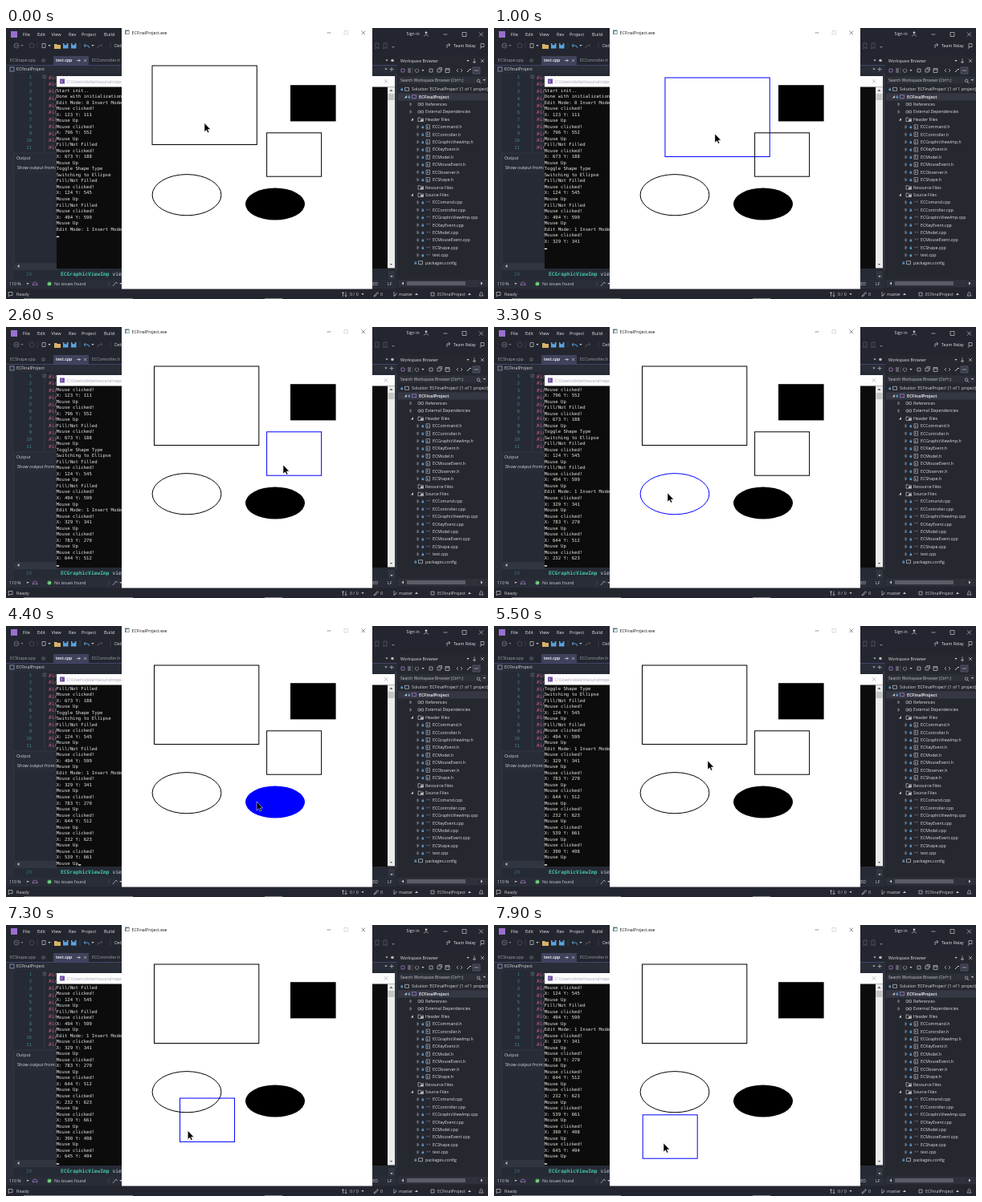
An HTML page for the animation above (8000 ms loop, 600 px wide and 338 px high).

```html
<!DOCTYPE html>
<html lang="en">
<head>
<meta charset="utf-8">
<title>Shape editor session</title>
<style>
  html, body { margin: 0; width: 100%; height: 100%; overflow: hidden; background: #23262f; }
  svg { display: block; width: 100vw; height: 100vh; }
  text { font-family: "Open Sans", "Noto Sans", sans-serif; white-space: pre; }
  .mono { font-family: "DejaVu Sans Mono", "Liberation Mono", monospace; }
</style>
</head>
<body>
<svg id="stage" viewBox="0 0 600 338">
  <g id="ide"></g>
  <g id="terminal"></g>
  <g id="app"></g>
</svg>
<script>
const $ = id => document.getElementById(id);

// Markup helpers
const box = (x, y, w, h, fill, extra = '') =>
  `<rect x="${x}" y="${y}" width="${w}" height="${h}" fill="${fill}" ${extra}/>`;
const label = (x, y, s, fill = '#d4d4d8', size = 5.25, extra = '') =>
  `<text x="${x}" y="${y + size * 0.36}" font-size="${size}" fill="${fill}" ${extra}>${s}</text>`;
const line = (d, stroke = '#c8c8cc', width = 0.7) =>
  `<path d="${d}" fill="none" stroke="${stroke}" stroke-width="${width}"/>`;
const solid = (d, fill = '#c8c8cc') => `<path d="${d}" fill="${fill}"/>`;
const dot = (x, y, r, fill) => `<circle cx="${x}" cy="${y}" r="${r}" fill="${fill}"/>`;
const cross = (x, y, r, color, w) =>
  line(`M${x - r} ${y - r}l${2 * r} ${2 * r}m0 ${-2 * r}l${-2 * r} ${2 * r}`, color, w);
const down = (x, y, color) => solid(`M${x - 1.6} ${y - 1}h3.2l-1.6 2z`, color);
const MONO = 'class="mono"';

function menuAndToolbar() {
  const menu = [['File', 21], ['Edit', 39], ['View', 56.5], ['Rev', 78], ['Project', 94], ['Build', 122]];
  return box(0, 0, 600, 338, '#23262f') +
    box(6, 4, 8, 8, '#9a6fd0') +
    menu.map(([s, x]) => label(x, 8, s, '#e4e4e8', 5.6)).join('') +
    label(498.5, 7, 'Sign in', '#e4e4e8') +
    dot(523, 5.8, 1.4, '#c8c8cc') + line('M520.3 10.5q2.7-4.5 5.4 0') +
    line('M544.5 8h5') + line('M568 5.5h5v5h-5z') + cross(591.5, 8, 2.5, '#c8c8cc', 0.7) +
    // toolbar
    line('M10 22a3 3 0 1 0 6 0a3 3 0 1 0-6 0m1.2 0h3.6', '#85858f') + down(20, 22, '#77777f') +
    line('M29 22a3 3 0 1 0 6 0a3 3 0 1 0-6 0', '#555560') + line('M39 18v8', '#44444e') +
    line('M45 19.5h4v5h-4z') + down(54, 22) +
    solid('M60 20h3l1 1h4v5h-8z', '#d9b36a') +
    box(71, 19, 6.5, 6.5, '#5ba3e0') + box(72.5, 19, 3.2, 2.2, '#23262f') +
    box(81, 19, 6.5, 6.5, '#5ba3e0') + box(82.5, 19, 3.2, 2.2, '#23262f') +
    line('M92 18v8', '#44444e') + line('M97 22h4q3 0 2.5 3M99 20l-2 2l2 2', '#5ba3e0', 0.9) +
    down(108, 22) + line('M114 25q0-3 3-3h3l-2-2', '#666670') + line('M130 18v8', '#44444e') +
    label(135, 22, 'Debug') +
    line('M460 19h4v7l-2-2l-2 2zM470 19h4v7l-2-2l-2 2z', '#5c5f6a') + down(482, 24, '#888') +
    line('M549 25v-4h3m-1-2l2 2l-2 2', '#d0d0d4') + label(557, 22, 'Team Relay', '#e0e0e4') +
    line('M591 19.5h4v4h-4zM590 26l2-3', '#c8c8cc');
}

function editor() {
  let s = label(5, 40.5, 'ECShape.cpp', '#a4a4ac') + line('M45 39h3v3h-3z', '#8c8c96', 0.6) +
    box(59, 35, 44, 11.5, '#40425c') +
    label(62, 40.5, 'test.cpp', '#fff', 5.25, 'font-weight="600"') +
    line('M88 40.5h5m-2-1.7v3.4', '#ddd') + cross(98.5, 40.5, 1.6, '#ddd', 0.6) +
    label(107, 40.5, 'ECController.h', '#a4a4ac') +
    box(0, 46, 487, 0.8, '#55508a') +
    box(0, 46.8, 487, 9.2, '#292d37') + box(5, 49, 5, 5, 'none', 'stroke="#9bb0d0" stroke-width=".7"') +
    label(13, 51.5, 'ECFinalProject', '#dcdce0') +
    box(0, 56, 487, 258, '#262a34') + box(0, 56, 10, 258, '#2b2f39');
  for (let i = 0; i < 11; i++) {
    const y = 61.3 + i * 8.75;
    s += label(32, y, i + 1, '#3f8494', 5.6, MONO + ' text-anchor="end"') +
      label(53, y, '#include', '#c45a78', 6.2, MONO);
  }
  s += line('M46 59h3.5v3.5h-3.5zM47 60.8h1.5', '#80808a', 0.5) + line('M48 63v92', '#484c56', 0.5) +
    down(474, 40.5) + dot(481, 40.5, 1.8, '#b8b8be') + down(473, 51.5) +
    line('M480 49v5m-2.5-2.5h5', '#c0c0c4') +
    box(484, 57, 3, 245, '#303440') +
    label(25, 307, '29', '#35707e', 6, MONO) +
    label(68, 307, 'ECGraphicViewImp', '#43c4a8', 6.3, MONO + ' font-weight="bold"') +
    label(132.5, 307, 'view', '#c8d8e8', 6.3, MONO) +
    // output panel
    box(10, 156, 54, 145.5, '#282c36', 'stroke="#3a3e48" stroke-width=".6"') +
    label(13, 162.5, 'Output', '#dcdce0') + label(14, 174, 'Show output from:', '#dcdce0', 5.5) +
    box(11, 181, 52, 112, '#262a34') +
    box(11, 293, 52, 8, '#31353f') + solid('M16.5 295v4l-2.5-2z') +
    // editor footer
    box(0, 314, 487, 11, '#292d37') + label(4, 319, '110 %') + down(27, 319) +
    line('M33 321q0-4 3-4t3 4l-3-1z', '#b080d8') + dot(54, 319, 2.6, '#57b560') +
    line('M52.8 319l1 1l1.7-2', '#fff', 0.6) + label(60, 319, 'No issues found') +
    line('M128 316v6', '#50505a') + line('M133 322l4-5m0 0l2 2') + down(143, 319) +
    label(447, 319, 'MIXED') + label(475, 319, 'LF') +
    box(476, 303, 8, 10, '#33363f') + down(480, 310);
  return s;
}

function tree() {
  const top = ['Solution \'ECFinalProject\' (1 of 1 project)', 'ECFinalProject', 'References',
    'External Dependencies', 'Header Files'];
  const headers = 'Command Controller GraphicViewImp KeyEvent Model MouseEvent Observer Shape'
    .split(' ').map(n => `EC${n}.h`);
  const sources = 'Comand Controller GraphicViewImp KeyEvent Model MouseEvent Shape'
    .split(' ').map(n => `EC${n}.cpp`);
  const rows = [...top, ...headers, 'Resource Files', 'Source Files', ...sources, 'test.cpp', 'packages.config'];
  let s = box(488, 35, 112, 290, '#25282f') +
    label(491, 41, 'Workspace Browser', '#e0e0e4', 5.1) +
    down(575, 41) + line('M583 38.5v4m-2 0h4m-2 0v2') + cross(593, 41, 1.9, '#ccc', 0.7) +
    line('M492 51h4v4h-4z', '#b080d8') + line('M500 53h4m-4 2h4m-4-4h4') + line('M506 49v8', '#55555e') +
    down(519, 53) + line('M511 51a2.2 2.2 0 1 0 1 0', '#b8b8bc') + line('M527 51h4v4h-4z') +
    line('M537 51h4v4h-4zm1.5-1.5h4v4') + line('M547 50.5h5v5h-5zM547 52h5') +
    line('M563 51l-2 2l2 2m3-4l2 2l-2 2') + line('M574 55l4-4m0 0l1 1', '#ccc', 1) +
    box(581, 49, 9, 8, '#3a3d48', 'stroke="#6a6490" stroke-width=".6"') + line('M583 53h5') +
    box(489, 60.5, 110, 9, '#2d3039') +
    label(491, 65, 'Search Workspace Browser (Ctrl+;)', '#c8c8cc', 4.9) +
    line('M588 64a1.7 1.7 0 1 0 .1 0m1 3l2 2') + down(595.5, 65) +
    box(488, 81.3, 112, 9.2, '#353843');
  rows.forEach((name, i) => {
    const y = 76.3 + i * 9.41;
    const file = /\.(h|cpp)$/.test(name);
    const x = i == 0 ? 505 : i == 1 ? 514 : file ? 531 : 522;
    s += label(x, y, name, '#e0e0e4', 5.25, i == 1 ? 'font-weight="bold"' : '');
    const open = i == 1 || name == 'Header Files' || name == 'Source Files';
    if (open) s += solid(`M${x - 15} ${y + 1.5}h-3.2l3.2-3.2z`);
    else if (i && i < 24 && name != 'Resource Files' && name != 'packages.config')
      s += line(`M${x - 19} ${y - 1.8}l2 1.8l-2 1.8z`, '#b8b8be', 0.6);
    if (file || i < 2 || name == 'packages.config') s += box(x - 13.5, y - 0.3, 2.6, 2.2, '#5a9bd0') +
      line(`M${x - 13} ${y}v-1.2h1.6v1.2`, '#5a9bd0', 0.5);
    if (/\.h$/.test(name)) s += line(`M${x - 8} ${y - 2.6}h4.5v5.2h-4.5z`, '#c8c8cc', 0.6) +
      label(x - 7.2, y, 'h', '#d8d8dc', 4);
    else if (file) s += label(x - 8, y, '++', '#b070c0', 4.6);
    else if (i == 2 || i == 3) s += line(`M${x - 9} ${y - 1.5}h2.5v3h-2.5zm4 0h2.5v3h-2.5zm-1.5 1.5h1.5`, '#c0c0c4', 0.6);
    else if (/Files/.test(name)) s += line(`M${x - 9} ${y - 2}h2.5l1 1h3v3.6h-6.5z`, '#c0c0c4', 0.7) +
      box(x - 6, y, 3.5, 2.4, '#b8b8bc');
    else s += line(`M${x - 8.5} ${y - 2}h5v4h-5z`, i == 1 ? '#b080d8' : '#c8c8cc', 0.7);
  });
  return s + box(488, 314, 112, 9, '#2e313a') + box(499, 316, 73, 5, '#5a5d66') +
    solid('M495 316.5v4l-2.5-2z') + solid('M591 316.5v4l2.5-2z');
}

function statusBar() {
  return box(0, 325, 600, 13, '#23262f') +
    line('M3 329.5h5v4h-3l-1.5 1.5z') + label(13, 332, 'Ready', '#d4d4d8', 5.5) +
    line('M419.5 335v-5.5l-1.5 1.5m1.5-1.5l1.5 1.5m2-1.5v5.5l-1.5-1.5m1.5 1.5l1.5-1.5') +
    label(428, 332, '0 / 0') + down(444, 332) +
    line('M458 335l1-2l3.5-3.5l1 1l-3.5 3.5z') + label(466, 332, '0') +
    line('M483 329v6m0-1q3 0 3-3.5') + label(489, 332, 'master') + solid('M509 333h4l-2-2.5z') +
    line('M529 330h4v4h-4z') + label(537, 332, 'ECFinalProject') + solid('M575 333h4l-2-2.5z') +
    line('M589 334h5l-1-1.5v-2q-1.5-2.5-3 0v2z') +
    box(22, 337.2, 136, 0.8, '#a0a0a0') + box(322, 337.2, 22, 0.8, '#a0a0a0');
}

$('ide').innerHTML = menuAndToolbar() + editor() + tree() + statusBar();

// Terminal window
const ROWS = 30, ROW_H = 7.52;
$('terminal').innerHTML = box(63, 60, 421, 240, '#0c0c0c') + box(63, 60, 421, 13.5, '#fdfdfd') +
  box(67, 63.5, 6, 6, '#6f4fa0') + line('M68.3 65l1.5 1.5l-1.5 1.5', '#fff', 0.6) +
  label(75.5, 66.7, 'C:\\Users\\dolan\\source\\repos', '#a69ab4', 5.4) +
  cross(473, 66.5, 2.3, '#999', 0.6) +
  box(475, 73.5, 9, 226, '#ececec') + box(475.5, 82, 8, 8, '#c6c6c6') +
  solid('M477.5 79h4l-2-2.5z', '#666') + down(479.5, 295, '#666') +
  Array.from({ length: ROWS }, (_, i) =>
    label(62.7, 77.6 + i * ROW_H, '', '#e6e6e6', 5.65, MONO)).join('') +
  '<rect id="caret" width="3.2" height="1.4" fill="#f2f2f2"/>';
const rowTexts = [...$('terminal').querySelectorAll('text.mono')];

// Application window
$('app').innerHTML = box(144, 0, 312, 325.5, '#fff') +
  box(148, 2.5, 5.5, 5.5, '#5c7f86') + box(149.5, 4, 3.4, 3.4, '#e8f0f0') +
  label(156.5, 5.7, 'ECFinalProject.exe', '#111', 5.2) +
  line('M399.5 6h5', '#555', 0.6) + line('M421 3.5h4.5v4.5h-4.5z', '#c4c4c4', 0.6) + cross(444.8, 5.8, 2.3, '#444', 0.6) +
  '<g stroke-width="1">' +
  box(182, 47, 130.3, 98.5, 'none', 'id="big"') +
  box(354, 71.2, 56.6, 45.2, '#000', 'id="block"') +
  box(324.6, 130.8, 68, 54.4, 'none', 'id="small"') +
  '<ellipse id="ring" cx="225" cy="208.2" rx="42.9" ry="25.6" fill="none"/>' +
  '<ellipse id="disc" cx="335" cy="219.6" rx="37" ry="20"/></g>' +
  '<path id="pointer" d="M0-1V10L2.5 7.7L4.2 11.2L5.8 10.4L4.3 7H7.6Z" stroke="#fff" stroke-width=".5"/>';

// Pointer path: time, x, y
const path = [
  [0, 247, 119.5], [100, 247, 119.5], [600, 295, 143], [1000, 275, 133], [1500, 249.5, 121.5],
  [1600, 249.5, 121.5], [1950, 388, 97], [2150, 388, 97], [2480, 345, 173], [2850, 345, 173],
  [3300, 216, 208], [3550, 216, 208], [4000, 312, 220], [4450, 312, 220], [5100, 266, 169],
  [5700, 266, 169], [6250, 345, 167], [6440, 345, 167], [6540, 332.5, 169.5], [6600, 326, 173],
  [7100, 262, 240], [7550, 182, 279], [7840, 205.5, 273], [7900, 211, 273], [8000, 214, 273]
];
// Presses: down, up, reported position, shape hit
const presses = [
  [100, 1550, 'X: 329 Y: 341', 'big'], [1950, 2150, 'X: 783 Y: 270', 'block'],
  [2500, 2750, 'X: 644 Y: 512', 'small'], [3300, 3450, 'X: 232 Y: 623', 'ring'],
  [4300, 4400, 'X: 539 Y: 661', 'disc'], [5150, 5250, 'X: 390 Y: 498', null],
  [6350, 7850, 'X: 645 Y: 494', 'small']
];
const click = pos => ['Mouse clicked!', pos, 'Mouse Up'];
const FILL = 'Fill/Not Filled';
const intro = ['Start init..', 'Done with initialization', 'Edit Mode: 0 Insert Mode',
  ...click('X: 123 Y: 111'), ...click('X: 796 Y: 552'), FILL, ...click('X: 673 Y: 188'),
  'Toggle Shape Type', 'Switching to Ellipse', FILL, ...click('X: 124 Y: 545'),
  FILL, ...click('X: 494 Y: 599'), 'Edit Mode: 1 Insert Mode'];
const LOOP = 8000, LAG = 60;

function pointerAt(t) {
  const i = Math.max(1, path.findIndex(p => p[0] >= t));
  const [t0, x0, y0] = path[i - 1], [t1, x1, y1] = path[i];
  const k = (t - t0) / (t1 - t0);
  return [x0 + (x1 - x0) * k, y0 + (y1 - y0) * k];
}

function drawTerminal(t) {
  const lines = [...intro];
  let newline = true;
  for (const [from, to, pos] of presses) {
    if (t >= from) lines.push(...click(pos).slice(0, t >= to ? 3 : 2));
    if (t >= to && t < to + 50) newline = false;
  }
  if (newline) lines.push('');
  const shown = lines.slice(-ROWS);
  rowTexts.forEach((el, i) => el.textContent = shown[i] || '');
  const last = shown.length - 1;
  $('caret').setAttribute('x', 62.9 + shown[last].length * 3.4);
  $('caret').setAttribute('y', 79.2 + last * ROW_H);
}

function drawShapes(t) {
  const state = {};
  for (const id of ['big', 'block', 'small', 'ring', 'disc']) state[id] = { x: 0, y: 0, color: '#000' };
  for (const [from, to, , id] of presses) {
    if (!id || t < from) continue;
    const [x0, y0] = pointerAt(from);
    const [x, y] = pointerAt(Math.max(from, Math.min(t - LAG, to)));
    state[id].x += x - x0;
    state[id].y += y - y0;
    if (t < to + 100) state[id].color = '#00f';
  }
  for (const id in state) {
    const { x, y, color } = state[id], el = $(id);
    el.setAttribute('transform', `translate(${x} ${y})`);
    el.setAttribute(id == 'block' || id == 'disc' ? 'fill' : 'stroke', color);
  }
}

function frame() {
  const t = performance.now() % LOOP;
  drawTerminal(t);
  drawShapes(t);
  $('pointer').setAttribute('transform', `translate(${pointerAt(t)})`);
  requestAnimationFrame(frame);
}
frame();
</script>
</body>
</html>
```
